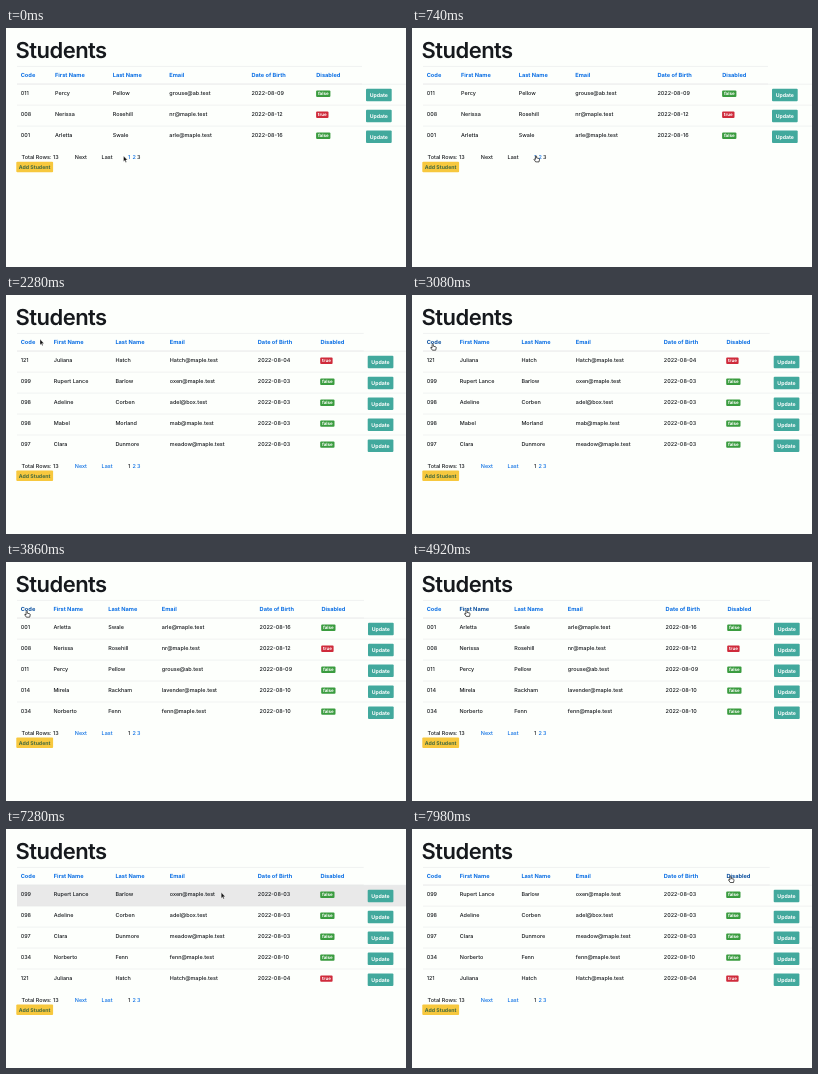
An HTML page that plays this animation: 400 by 239 pixels, repeating every 8 s.

```html
<!DOCTYPE html>
<html lang="en">
<head>
<meta charset="utf-8">
<title>Students</title>
<style>
  html, body { margin: 0; width: 100%; height: 100%; overflow: hidden; background: #fdfffc; }
  svg { display: block; width: 100vw; height: 100vh; }
  text { font: 500 5.45px Inter, Roboto, sans-serif; fill: #16191d; text-rendering: geometricPrecision; }
  .title { font-size: 22px; font-weight: 600; letter-spacing: -.55px; }
  .head { font-size: 5.65px; font-weight: 700; fill: #0b6fe4; }
  .head.over { fill: #0a4f9f; }
  .link { fill: #0b6fe4; }
  .badge { font-size: 4.5px; font-weight: 700; fill: #fff; text-anchor: middle; }
  .button { font-size: 5.2px; font-weight: 700; fill: #fff; text-anchor: middle; }
  .add { font-size: 5.2px; font-weight: 700; fill: #40683f; text-anchor: middle; }
  .line { stroke: #e0e4e4; stroke-width: .5; }
</style>
</head>
<body>
<svg viewBox="0 0 400 239" preserveAspectRatio="none">
  <rect id="hover" x="11" width="389" height="20.9" fill="#e9e9e9"/>
  <text class="title" x="9.6" y="30.4">Students</text>
  <g id="views"></g>
  <g id="pointer">
    <path id="arrow" d="M0 0V5.6L1.3 4.4L2.2 6.4L3.1 6L2.2 4.1H4Z" fill="#111" stroke="#fff" stroke-width=".35"/>
    <path id="beam" d="M-1.2 0Q0 0 0 .8Q0 0 1.2 0M0 .8V4.2M-1.2 5Q0 5 0 4.2Q0 5 1.2 5" fill="none" stroke="#222" stroke-width=".6"/>
    <path id="hand" d="M-.6 .1Q0-1 .6 .1V1.9L3 2.5Q3.7 2.7 3.5 3.7L3 5.9H-.3L-2 3.5Q-2.2 2.5-.6 3.4Z" fill="#fff" stroke="#111" stroke-width=".7"/>
  </g>
</svg>
<script>
const LOOP = 8000, TABLE_TOP = 56.2, ROW = 20.95, PAGE = 5;
const HEADS = ["Code", "First Name", "Last Name", "Email", "Date of Birth", "Disabled"];

// code, first name, last name, email, month-day of birth, disabled
const students = `
001,Arletta,Swale,arle@maple.test,08-16,false
008,Nerissa,Rosehill,nr@maple.test,08-12,true
011,Percy,Pellow,grouse@ab.test,08-09,false
014,Mirela,Rackham,lavender@maple.test,08-10,false
034,Norberto,Fenn,fenn@maple.test,08-10,false
043,Silvain,Sturmey,walker@maple.test,08-11,false
065,Wren,Wadham,quillpen@campus.test,08-05,false
065,Olga,Oakhurst,oak@maple.test,08-16,false
097,Clara,Dunmore,meadow@maple.test,08-03,false
098,Adeline,Corben,adel@box.test,08-03,false
098,Mabel,Morland,mab@maple.test,08-03,false
099,Rupert Lance,Barlow,oxen@maple.test,08-03,false
121,Juliana,Hatch,Hatch@maple.test,08-04,true`
  .trim().split("\n").map(row => row.split(","));

// Column positions follow the widest cell of each page; the seventh is the button.
const views = [
  { start: 0,    key: 0, dir: -1, page: 3, cols: [14.7, 49, 106.7, 163.3, 245.5, 310.3, 360] },
  { start: 780,  key: 0, dir: -1, page: 1, cols: [14.7, 47.8, 109.4, 163.8, 251.8, 314.4, 361.7] },
  { start: 3500, key: 0, dir: 1,  page: 1, cols: [14.7, 47.4, 102.2, 155.8, 253.6, 315.4, 362] },
  { start: 5300, key: 1, dir: 1,  page: 1, cols: [14.7, 48.8, 106.5, 162, 251.5, 314.2, 361.6] },
  { start: 5800, key: 1, dir: -1, page: 1, cols: [14.7, 46.7, 106.2, 158.9, 257, 317.5, 363] },
  { start: 6750, key: 2, dir: 1,  page: 1, cols: [14.7, 47.8, 109.4, 163.8, 251.8, 314.4, 361.7] },
];

// time, x, y, pointer shape
const path = [
  [0, 117.5, 128, "arrow"], [250, 117.5, 128, "arrow"], [500, 124, 128, "hand"],
  [840, 124, 128, "arrow"], [1100, 52, 87.5, "beam"], [1500, 52, 87.5, "beam"],
  [1900, 44, 74, "arrow"], [2200, 34, 44.3, "arrow"], [2450, 34, 44.3, "arrow"],
  [2900, 20.7, 49.3, "hand"], [4200, 20.7, 49.3, "hand"], [4700, 54.5, 48.5, "hand"],
  [5900, 54.5, 48.5, "hand"], [6200, 121.7, 45, "hand"], [6800, 121.7, 45, "arrow"],
  [7200, 205, 63, "arrow"], [7500, 262, 66, "arrow"], [7850, 318.5, 47.6, "hand"],
  [LOOP, 318.5, 47.6, "hand"],
];

const $ = id => document.getElementById(id);
const text = (x, y, s, cls = "") => `<text class="${cls}" x="${x}" y="${y}">${s}</text>`;
const box = (x, y, w, h, fill, r = 1) =>
  `<rect x="${x}" y="${y}" width="${w}" height="${h}" rx="${r}" fill="${fill}"/>`;
const line = (y, end) => `<path class="line" d="M11 ${y}H${end}"/>`;

function drawRow(student, cols, top) {
  const [code, first, last, email, birth, disabled] = student;
  const base = top + 11.1, on = disabled === "true", w = on ? 12.4 : 14.3;
  const cells = [code, first, last, email, "2022-" + birth];
  return line(top, 400)
    + cells.map((s, i) => text(cols[i], base, s)).join("")
    + box(cols[5] - .2, top + 6.4, w, 6.4, on ? "#cf2b3b" : "#3a9c3f")
    + text(cols[5] - .2 + w / 2, top + 11.1, disabled, "badge")
    + box(cols[6], top + 4.5, 25.7, 12.5, "#42a99d")
    + text(cols[6] + 12.8, top + 12.6, "Update", "button");
}

function drawView({ key, dir, page, cols }) {
  const rows = [...students]
    .sort((a, b) => dir * (a[key] < b[key] ? -1 : a[key] > b[key] ? 1 : 0))
    .slice((page - 1) * PAGE, page * PAGE);
  const end = TABLE_TOP + rows.length * ROW, base = end + 12.1, edge = cols[6] - 4;
  const more = page < 3 ? "link" : "";
  return line(38.4, edge) + line(TABLE_TOP - .3, edge)
    + HEADS.map((s, i) => text(cols[i], 49.4, s, "head")).join("")
    + rows.map((s, i) => drawRow(s, cols, TABLE_TOP + i * ROW)).join("")
    + text(15.6, base, "Total Rows: 13")
    + text(68.8, base, "Next", more) + text(95.6, base, "Last", more)
    + [1, 2, 3].map(n => text(117.4 + n * 4.5, base, n, n === page ? "" : "link")).join("")
    + box(10.3, end + 14.6, 36.8, 10.5, "#f7c83e")
    + text(28.6, end + 21.7, "Add Student", "add");
}

const groups = views.map(view => {
  const g = document.createElementNS("http://www.w3.org/2000/svg", "g");
  g.innerHTML = drawView(view);
  $("views").append(g);
  return { g, heads: [...g.querySelectorAll(".head")] };
});

function pointerAt(t) {
  const i = path.findLastIndex(p => p[0] <= t);
  const a = path[i], b = path[Math.min(i + 1, path.length - 1)];
  const u = (t - a[0]) / (b[0] - a[0] || 1), e = u * u * (3 - 2 * u);
  return { x: a[1] + (b[1] - a[1]) * e, y: a[2] + (b[2] - a[2]) * e, shape: u > .75 ? b[3] : a[3] };
}

const show = (el, on) => el.setAttribute("visibility", on ? "visible" : "hidden");

function frame(now) {
  const t = now % LOOP;
  const current = views.findLastIndex(v => v.start <= t);
  const { x, y, shape } = pointerAt(t);
  groups.forEach(({ g }, i) => show(g, i === current));

  const cols = views[current].cols;
  const column = cols.findLastIndex(c => c <= x + 1);
  groups[current].heads.forEach((head, i) =>
    head.classList.toggle("over", shape === "hand" && y < 54 && i === column));

  // A new page picks up the row highlight only once the pointer moves.
  const row = Math.floor((y - TABLE_TOP) / ROW);
  show($("hover"), t >= 840 && row >= 0 && row < PAGE);
  $("hover").setAttribute("y", TABLE_TOP + row * ROW);

  $("pointer").setAttribute("transform", `translate(${x} ${y})`);
  for (const id of ["arrow", "beam", "hand"]) show($(id), id === shape);
}

const begin = performance.now();
function tick() {
  frame(performance.now() - begin);
  requestAnimationFrame(tick);
}
tick();
</script>
</body>
</html>
```
